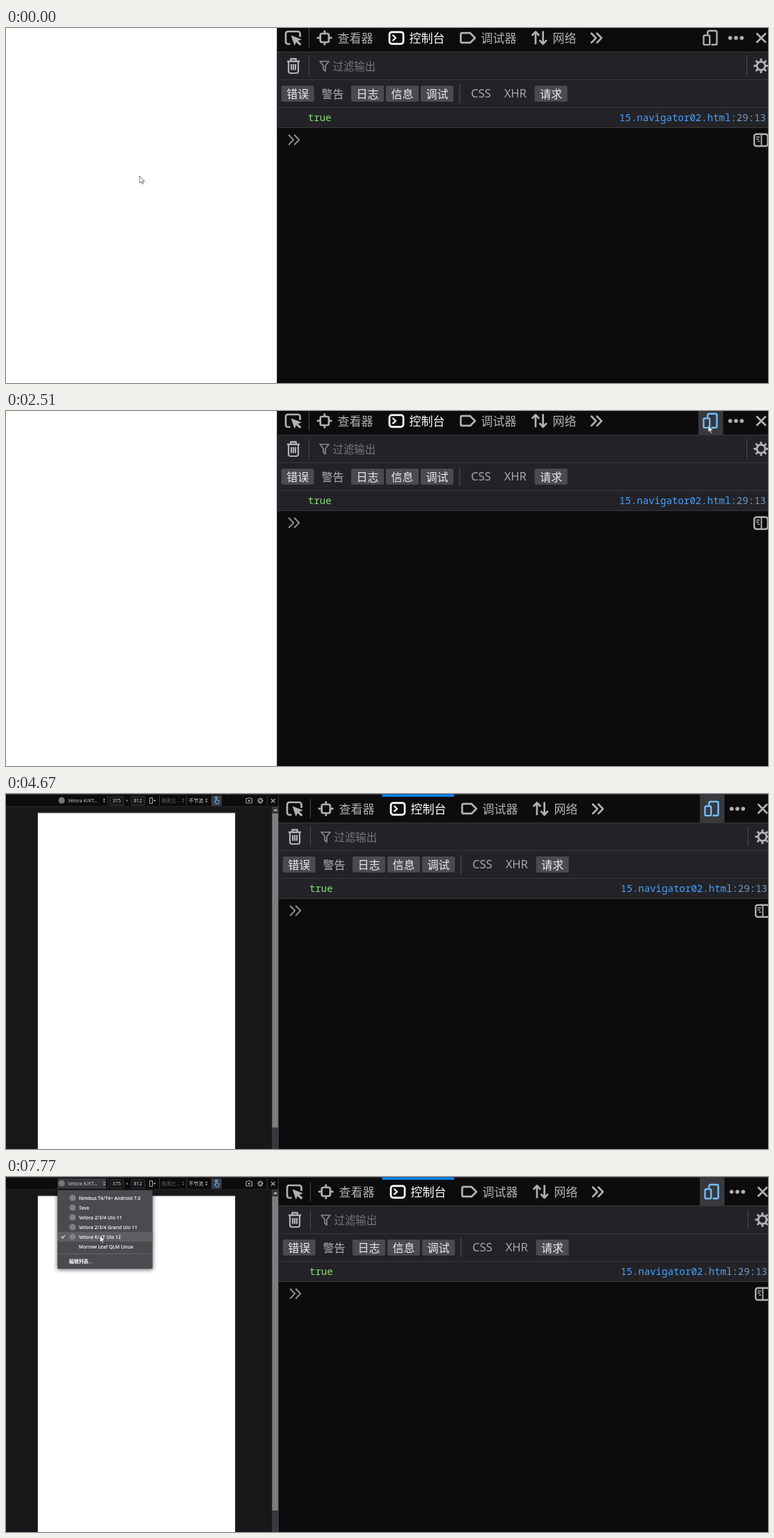
Recreate the animation shown at these times as an HTML page. Size 1095 px wide and 511 px high, loop 8000 ms.

```html
<!DOCTYPE html>
<html lang="zh">
<head>
<meta charset="utf-8">
<title>Console and device view</title>
<style>
html, body { margin: 0; width: 100%; height: 100%; overflow: hidden; background: #0c0c0d; }
svg { display: block; width: 100%; height: 100%; }
text { font-family: "Open Sans", "Noto Sans CJK SC", "Noto Sans CJK", sans-serif; white-space: pre; }
.mono { font-family: "Noto Sans Mono", "DejaVu Sans Mono", monospace; }
#menu { filter: drop-shadow(0 1px 3px rgba(0, 0, 0, .7)); }
#menu text { font-weight: 600; }
</style>
</head>
<body>
<svg id="stage" viewBox="0 0 1095 511"></svg>
<script>
const LOOP = 8000;
const GREY = '#b1b1b3', LINE = '#38383d', BASE = '#0c0c0d', BAR = '#232327', BLUE = '#75bfff';

const rect = (x, y, w, h, fill, more = '') =>
  `<rect x="${x}" y="${y}" width="${w}" height="${h}" fill="${fill}" ${more}/>`;
const text = (x, y, str, size, fill = GREY, more = '') =>
  `<text x="${x}" y="${y}" font-size="${size}" fill="${fill}" ${more}>${str}</text>`;
const path = (d, color = GREY, width = 2.7, more = '') =>
  `<path d="${d}" fill="none" stroke="${color}" stroke-width="${width}" stroke-linejoin="round" ${more}/>`;
const frame = (x, y, w, h, r, color = GREY, width = 2.7) =>
  rect(x, y, w, h, 'none', `rx="${r}" stroke="${color}" stroke-width="${width}"`);
const shape = (d, fill = GREY) => `<path d="${d}" fill="${fill}"/>`;
const dot = (x, y, r, fill = GREY) => `<circle cx="${x}" cy="${y}" r="${r}" fill="${fill}"/>`;
const group = (id, body, more = '') => `<g id="${id}" ${more}>${body}</g>`;

function gear(x, y, r, width) {
  let d = '';
  for (let i = 0; i < 8; i++) {
    const a = i * Math.PI / 4, c = Math.cos(a), s = Math.sin(a);
    d += `M${x + c * r} ${y + s * r}L${x + c * r * 1.75} ${y + s * r * 1.75}`;
  }
  return `<circle cx="${x}" cy="${y}" r="${r}" fill="none" stroke="${GREY}" stroke-width="${width}"/>` + path(d, GREY, width);
}

const chevrons = (x, y, color, width) =>
  path(`M${x} ${y}l6.5 6.7-6.5 6.7m8 -13.4l6.5 6.7-6.5 6.7`, color, width, 'stroke-linecap="round"');

// Up and down triangles of a drop-down field
const spinner = (x, fill = GREY) =>
  shape(`M${x - 1.7} 8.4h3.4l-1.7-2.2zM${x - 1.7} 10h3.4l-1.7 2.2z`, fill);

function tabs() {
  return rect(390, -7, 710, 41, BASE) + rect(390, -7, 710, 1, LINE) + rect(538.5, -6.5, 103.5, 3.5, '#0a84ff') +
    path('M408.500 23H405a3 3 0 0 1-3-3V8a3 3 0 0 1 3-3h14.500a3 3 0 0 1 3 3v5') +
    shape('M409.500 10.500L425 16.500 419.500 18.500 424.500 23 422 25.300 417 20.500 414.600 25.500Z') +
    rect(435, 0, 1, 28, '#4a4a4f') +
    frame(451.7, 8, 12.2, 12.5, 2.5) +
    path('M446.800 14.200h4.500M464.500 14.200h4M457.800 3.500v4M457.800 21v3.700') +
    text(476.5, 21, '查看器', 17) +
    frame(551, 5.8, 20, 17, 3.5, '#fff') +
    path('M555.500 10l4.500 4.200-4.500 4.200', '#fff', 2.2) +
    text(579.5, 21, '控制台', 17, '#fff') +
    path('M655.500 7.200h11.500l7 7-7 7h-11.500a2 2 0 0 1-2-2V9.200a2 2 0 0 1 2-2z') +
    text(682.5, 21, '调试器', 17) +
    path('M761 23.500V6M755.800 11l5.200-5.600 5.200 5.600M771.700 4.500V22M766.500 17.400l5.200 5.600 5.200-5.600') +
    text(785.5, 21, '网络', 17) +
    chevrons(841.3, 7.7, GREY, 2.7) +
    rect(995, -6, 35.5, 40, LINE, 'id="hover"') +
    group('device', path('M1008.200 9V6a2 2 0 0 1 2-2h9.300a2 2 0 0 1 2 2v16a2 2 0 0 1-2 2h-6', 'currentColor', 2.4) +
      frame(1002.5, 10.5, 8.7, 13.7, 1.8, 'currentColor', 2.3)) +
    dot(1040.7, 14.3, 2.8) + dot(1049, 14.3, 2.8) + dot(1057.3, 14.3, 2.8) +
    path('M1078.500 7.500l13.500 13.500M1092 7.500l-13.500 13.500');
}

function filters() {
  const pill = (x, str, on = true) =>
    (on ? rect(x, 83, 47, 23, '#4a4a4f', 'rx="2"') : '') +
    text(x + 7.5, 100.6, str, 16, on ? '#ececee' : GREY);
  return rect(390, 34, 710, 81, BAR) + rect(390, 34, 710, 1, LINE) + rect(390, 74, 710, 1, LINE) +
    path('M404 48h18M409.300 47.500v-3h7.400v3', GREY, 2.4) +
    path('M406 49v13a3 3 0 0 0 3 3h8a3 3 0 0 0 3-3V49M410 52v8.500M413 52v8.500M416 52v8.500', GREY, 2.2) +
    rect(435, 40, 1, 28, '#4a4a4f') +
    path('M451 48h13l-5 6v8l-3-2.500V54z', '#8a8a8d', 1.7) +
    text(469.5, 60.7, '过滤输出', 15.4, '#77777b') +
    rect(1064, 40, 1, 28, '#4a4a4f') + gear(1085, 54.5, 6, 2.8) +
    pill(395.7, '错误') + pill(446, '警告', false) + pill(496, '日志') +
    pill(546, '信息') + pill(596, '调试') +
    rect(651.5, 81, 1, 27, '#5a5a5e') +
    text(668.3, 100.3, 'CSS', 16.5) + text(716, 100.3, 'XHR', 16.5) +
    pill(759.7, '请求') + rect(390, 114, 710, 1, LINE);
}

function output() {
  const row = rect(390, 115, 710, 28, BAR) + rect(390, 143, 710, 1, LINE) +
    text(434, 134, 'true', 14.05, '#86de74', 'class="mono"') +
    text(1092, 134, '15.navigator02.html<tspan fill="#709ac2">:29:13</tspan>', 14.05, '#45a1ff', 'class="mono" text-anchor="end"');
  const prompt = chevrons(406.7, 154.2, '#939395', 2) +
    frame(1075.2, 152.7, 19.5, 17.3, 3.2, GREY, 2.4) +
    path('M1085.500 153v17', GREY, 1.9) + path('M1078 157h5M1078 160h4M1080 163h3', GREY, 1.3);
  return rect(390, 115, 710, 410, BASE) + group('row', row) + group('prompt', prompt);
}

const devices = [
  ['Nimbus T4/T4+ Android 7.0', 1], ['Tavo', 1], ['Velora 2/3/4 Ulo 11', 1],
  ['Velora 2/3/4 Grand Ulo 11', 1], ['Velora K/KT Ulo 12', 1], ['Morrow Leaf QLM Linux', 0]
];

function deviceView() {
  const size = (x, str) => rect(x + .5, 3.5, 19.5, 12.5, '#18181a', `stroke="${LINE}" rx="1"`) +
    text(x + 10, 11.7, str, 7, '#d7d7db', 'text-anchor="middle"');
  const sep = x => rect(x, 2, 1, 15, LINE);
  const page = (x, y, w, h) => rect(x, y, w, h, '#fff', 'stroke="#9b9b9b" stroke-opacity=".4" paint-order="stroke" stroke-width="2"');
  const loaded = rect(74, 2, 70, 15, LINE, 'id="field"') + dot(80, 9.2, 4.6, '#77777a') +
    text(89, 11.7, 'Velora K/KT...', 7, '#d7d7db') + spinner(141) +
    path('M206.500 5.500h4v8h-4zM212 9.500h2.500m-1.200-1.300l1.300 1.300-1.300 1.300', GREY, 1) +
    rect(295, 2, 15, 15, '#353b48', 'rx="1"') +
    path('M301.500 11V5.500a.8.800 0 0 1 1.600 0V9l3 .7v2l-1 2.300h-3.500l-2.300-3 .7-.5zM299.500 6a3 3 0 0 1 5.500 0', BLUE, .9) +
    path('M345 6.500h2.300l.7-1h2.600l.7 1h2.200v6.500H345z', GREY, 1) + dot(349.3, 9.7, 1.4) +
    gear(365.5, 9.5, 2.5, 1.2) + path('M381 7l5.500 5.500M386.500 7l-5.500 5.500', GREY, 1.1) +
    page(46, 27.5, 283, 500) +
    rect(382, 18, 9.5, 510, '#38383d') + rect(382.5, 28, 8.5, 452, '#7d7d7f') +
    path('M385 24.500l2.200-2.200 2.200 2.200', '#d7d7db', 1.2);
  const pending = text(109.5, 11.7, '设备型号', 7, '#6f6f72') + spinner(141, '#6f6f72') +
    rect(295, 2, 15, 15, LINE, 'rx="1"') + page(83.5, 27.5, 217.5, 471);
  return rect(0, -1, 391.5, 530, '#18181a') + rect(0, 0, 391.5, 18, BASE) + rect(0, 0, 391.5, 1, LINE) +
    rect(0, 17.5, 391.5, 1, '#2a2a2e') +
    sep(146) + sep(220) + sep(259) + sep(374.5) +
    size(149, '375') + text(172, 11.7, '×', 7, GREY) + size(179.5, '812') +
    text(223.5, 11.7, '像素比...', 7, '#626266') + spinner(254.5, '#626266') +
    text(262.5, 11.7, '不节流', 7, '#d7d7db') + spinner(288) +
    group('pending', pending) + group('loaded', loaded);
}

function menu() {
  const items = devices.map(([name, icon], i) =>
    (icon ? dot(95.7, 30 + 14 * i, 4.6, '#808084') : '') +
    text(104.7, 32.6 + 14 * i, name, 6.8, '#fff')).join('');
  return group('menu', rect(74, 19, 136.5, 113, '#4a4a4f') + rect(74, 79, 136.5, 14, '#5e5e63', 'id="pick"') +
    items + rect(74, 110, 136.5, 1, '#68686c') + text(90.5, 123.8, '编辑列表...', 7, '#fff') +
    path('M79.500 86l2 2 3-4.300', '#fff', 1.1, 'id="check"'));
}

const stage = document.getElementById('stage');
stage.innerHTML = group('scene',
  rect(-3, -8, 392.5, 530, '#fff') +
  group('view', deviceView() + menu(), 'transform="translate(-2 -7)"') +
  rect(389.2, -8, 1, 530, LINE) + tabs() + filters() + output()) +
  `<path id="cursor" d="M0 0V10L2.300 8 3.900 11.600 5.400 11 3.900 7.500H7Z" fill="#fff" stroke="#333" stroke-width=".7"/>`;

const el = {};
for (const node of stage.querySelectorAll('[id]')) el[node.id] = node;

// Pointer positions: time, x, y, each held until the next
const track = [
  [0, 192, 213], [1300, 318, 183], [1450, 650, 104], [1600, 939, 33], [1730, 972, 27],
  [1860, 990, 24], [2000, 1000, 22], [2130, 1006, 21], [2260, 1009, 20.5],
  [3050, 985, 25], [3200, 850, 48], [3350, 640, 68], [3500, 480, 70], [3650, 390, 60], [3810, 346, 48],
  [3960, 332, 25], [4100, 322, 5], [4230, 314, -9.5], [4670, 313.5, -10.5],
  [5430, 311, 1], [5860, 302, 3], [5990, 275, 5], [6110, 235, 7], [6230, 195, 9], [6360, 165, 9],
  [6480, 150, 9], [6600, 144, 8.5], [6720, 142, 8.5],
  [6960, 142, 13], [7100, 141, 25], [7230, 140, 40], [7370, 138, 57], [7500, 137, 71], [7640, 136, 80], [7770, 135, 84]
];

const show = (node, on) => node.setAttribute('display', on ? 'inline' : 'none');

function draw(t) {
  const [, x, y] = track.findLast(p => p[0] <= t);
  el.cursor.setAttribute('transform', `translate(${x} ${y})`);

  const pan = t < 4520 ? 0 : t < 4670 ? .5 : 1;
  el.scene.setAttribute('transform', `translate(${2 * pan} ${Math.round(7 * pan)})`);

  const cleared = t >= 500 && t < 1000;
  show(el.row, !cleared);
  el.prompt.setAttribute('transform', `translate(0 ${cleared ? -29 : 0})`);

  show(el.hover, t >= 2510 || x >= 995);
  el.device.setAttribute('color', t >= 2510 ? BLUE : GREY);

  show(el.view, t >= 2900);
  show(el.pending, t < 3050);
  show(el.loaded, t >= 3050);

  const open = t >= 6840, picking = t >= 6960;
  show(el.menu, open);
  show(el.check, picking);
  show(el.field, t >= 6600);
  el.field.setAttribute('fill', open && !picking ? '#353b48' : LINE);
  const index = Math.floor((y - 23) / 14);
  show(el.pick, picking && index >= 0);
  el.pick.setAttribute('y', 23 + 14 * index);
}

const start = performance.now();
function tick() {
  draw((performance.now() - start) % LOOP);
  requestAnimationFrame(tick);
}
tick();
</script>
</body>
</html>
```
